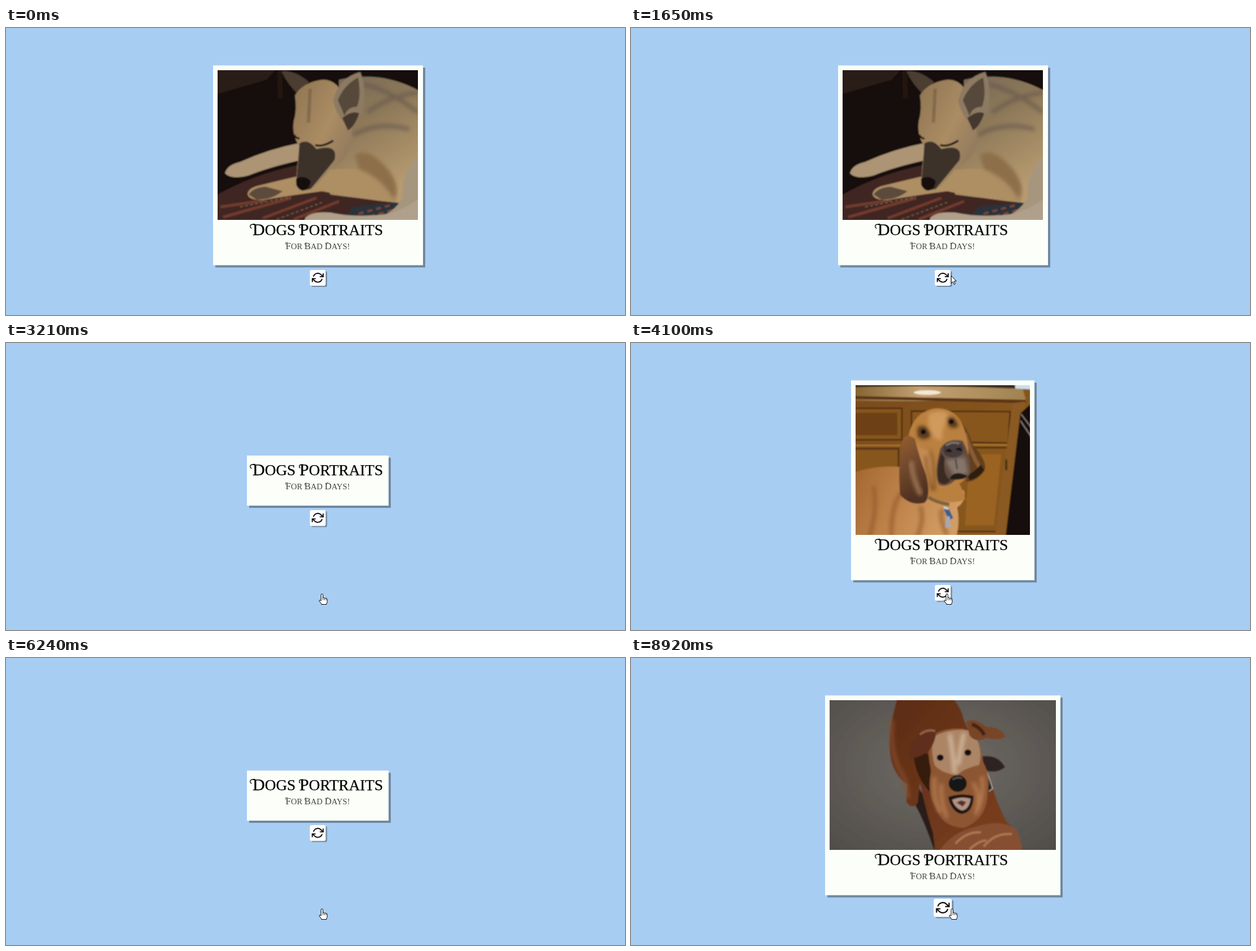
Animation of 1097x510 px, one loop 9360 ms. Source, as an HTML page:

```html
<!DOCTYPE html>
<html lang="en">
<head>
<meta charset="utf-8">
<title>Dogs Portraits</title>
<style>
html, body { margin: 0; width: 100%; height: 100%; overflow: hidden; background: #a8cdf3; }
.stage { display: block; width: 1097px; height: 510px; }
text { font-family: "Liberation Serif", "Times New Roman", serif; }
.title { font-size: 30.2px; stroke: #000; stroke-width: .25px; }
.title .sm { font-size: 27.2px; }
.sub { font-size: 17px; fill: #444; }
.sub .sm { font-size: 14.5px; }
.swash { fill: none; stroke: #000; stroke-linecap: round; }
.paper { fill: #fcfff9; }
.shade { fill: #70889f; }

/* One 9.36 s clock drives every part */
.card, .panel, .btn, .arrow, .hand, .pending { animation: 9.36s step-end infinite; }
.first { animation-name: first; }
.second { animation-name: second; }
.third { animation-name: third; }
.empty { animation-name: empty; }
.pending { animation-name: pending; }
.panel { animation-name: panel; }
.btn { animation-name: hover; animation-timing-function: ease; transform-origin: 552.5px 444px; }
.arrow { animation-name: arrow; }
.hand { animation-name: hand; }

@keyframes first { 0% { opacity: 1 } 32.79%, 100% { opacity: 0 } }
@keyframes second { 0% { opacity: 0 } 43.8% { opacity: 1 } 65.17%, 100% { opacity: 0 } }
@keyframes third { 0% { opacity: 0 } 75.85%, 100% { opacity: 1 } }
@keyframes empty {
  0%, 43.8% { opacity: 0 }
  32.79%, 65.17% { opacity: 1 }
  75.85%, 100% { opacity: 0 }
}
@keyframes pending { 0% { opacity: 1 } 76.06%, 100% { opacity: 0 } }
@keyframes panel {
  0%, 43.8% { transform: none }
  32.79%, 65.17% { transform: translateY(-133px) }
  75.85%, 100% { transform: none }
}
@keyframes hover {
  0%, 17.8% { transform: scale(1) }
  20.3%, 32.79% { transform: scale(1.15) }
  34.25%, 60.46% { transform: scale(1) }
  63.03%, 65.17% { transform: scale(1.15) }
  66.6%, 80.87% { transform: scale(1) }
  83.3%, 100% { transform: scale(1.15) }
}
@keyframes arrow {
  0% { opacity: 0; transform: translate(899px, 500px) }
  4.16% { opacity: 1; transform: translate(899px, 500px); animation-timing-function: cubic-bezier(.3, .1, .35, 1) }
  13.67% { opacity: 1; transform: translate(585px, 428px) }
  14.74% { opacity: 1; transform: translate(585px, 428px); animation-timing-function: ease-in-out }
  17.6% { opacity: 1; transform: translate(567px, 440px) }
  17.8%, 100% { opacity: 0; transform: translate(567px, 440px) }
}
@keyframes hand {
  0% { opacity: 0; transform: translate(566px, 441px) }
  17.8% { opacity: 1; transform: translate(566px, 441px); animation-timing-function: ease-out }
  19.4% { opacity: 1; transform: translate(560px, 446px); animation-timing-function: ease-in-out }
  22.11% { opacity: 1; transform: translate(554px, 435px) }
  27.77% { opacity: 1; transform: translate(554px, 435px); animation-timing-function: ease-out }
  28.84% { opacity: 1; transform: translate(560px, 446px) }
  80.87% { opacity: 1; transform: translate(560px, 446px); animation-timing-function: ease-in-out }
  85.04% { opacity: 1; transform: translate(565px, 446px) }
  86.75% { opacity: 1; transform: translate(566px, 446px) }
  94.76% { opacity: 1; transform: translate(567px, 446px) }
  95.29%, 100% { opacity: 1; transform: translate(569px, 446px) }
}
</style>
</head>
<body>
<svg class="stage" viewBox="0 0 1097 510">
  <defs>
    <filter id="soft" x="-5%" y="-5%" width="110%" height="110%"><feGaussianBlur stdDeviation="1"/></filter>
    <filter id="fold" x="-20%" y="-20%" width="140%" height="140%"><feGaussianBlur stdDeviation="3"/></filter>
    <linearGradient id="coat" x1="0" y1="0" x2=".5" y2="1">
      <stop stop-color="#75695a"/><stop offset=".45" stop-color="#8d7859"/><stop offset="1" stop-color="#b79b70"/>
    </linearGradient>
    <linearGradient id="face" x1="0" y1="0" x2="1" y2="1">
      <stop stop-color="#8e7452"/><stop offset=".5" stop-color="#ab8c63"/><stop offset="1" stop-color="#80705c"/>
    </linearGradient>
    <linearGradient id="tan" x1="0" y1="0" x2="1" y2=".3">
      <stop stop-color="#a0652f"/><stop offset=".5" stop-color="#bd8149"/><stop offset="1" stop-color="#d29c63"/>
    </linearGradient>
    <linearGradient id="wood" x1="0" y1="0" x2="1" y2="1">
      <stop stop-color="#784a1c"/><stop offset="1" stop-color="#945f22"/>
    </linearGradient>
    <linearGradient id="counter">
      <stop stop-color="#80602f"/><stop offset=".4" stop-color="#c3a273"/><stop offset="1" stop-color="#a08250"/>
    </linearGradient>
    <linearGradient id="ear" x1="0" y1="0" x2=".3" y2="1">
      <stop stop-color="#94602f"/><stop offset=".45" stop-color="#744a2d"/><stop offset="1" stop-color="#4e3020"/>
    </linearGradient>
    <radialGradient id="carpet" cx=".5" cy=".45" r=".7">
      <stop stop-color="#716c66"/><stop offset="1" stop-color="#504d49"/>
    </radialGradient>
    <linearGradient id="rust" x1="0" y1="0" x2="1" y2="1">
      <stop stop-color="#5c2b14"/><stop offset="1" stop-color="#7d4222"/>
    </linearGradient>
  </defs>

  <rect width="1097" height="510" fill="#a8cdf3"/>

  <g class="card first">
    <rect class="shade" x="371" y="70.5" width="372" height="355"/>
    <rect class="paper" x="367" y="66.5" width="372" height="355"/>
    <svg x="375" y="75" width="355" height="266" viewBox="375 75 355 266">
      <g filter="url(#soft)">
        <rect x="365" y="65" width="375" height="286" fill="#130e0b"/>
        <path d="M365 65H486L462 92L365 120Z" fill="#2c1c12"/>
        <path d="M480 65h9l2 60h-9z" fill="#24170f"/>
        <path d="M365 351V302Q430 262 520 243L640 300L740 310V351Z" fill="#402820"/>
        <path d="M380 318l80-12M385 336l120-34M455 338l95-36M510 340l80-32" stroke="#713a2d" stroke-width="5"/>
        <path d="M415 318l90-18M480 340l80-30" stroke="#a08061" stroke-width="1" stroke-dasharray="5 4"/>
        <path d="M615 318L705 308L692 336L600 338Z" fill="#29323b"/>
        <path d="M625 330l60-16M645 335l45-13" stroke="#7b4534" stroke-width="4" stroke-dasharray="9 7"/>
        <path d="M388 258Q392 243 415 238Q465 215 522 204L526 234Q470 246 430 262Q398 270 388 258Z" fill="#ac9474"/>
        <path d="M590 92C650 78 700 92 740 116V300Q712 314 690 310Q640 304 575 296L560 265Q585 240 590 200Z" fill="url(#coat)"/>
        <g filter="url(#fold)">
          <path d="M633 100Q680 110 730 150M640 150Q680 120 730 115M615 190Q660 165 715 180" fill="none" stroke="#5f5549" stroke-width="8" opacity=".55"/>
        </g>
        <path d="M740 215Q697 260 703 300Q690 330 640 345H740Z" fill="#a6967e"/>
        <path d="M530 338Q540 325 575 328Q620 338 680 330Q710 320 740 298V351H530Z" fill="#b0a08b"/>
        <path d="M428 295Q430 283 452 279Q520 262 572 252Q640 246 680 262Q702 285 690 310Q640 306 560 290Q500 298 455 306Q430 306 428 295Z" fill="#ae8e64"/>
        <path d="M618 225Q645 210 680 255Q700 285 686 304Q670 270 625 250Z" fill="#8d704b" filter="url(#fold)"/>
        <path d="M430 296q8-13 30-14l30 8q-20 16-46 15z" fill="#5b4b3c"/>
        <path d="M488 77Q512 74 537 96L520 120Q500 102 488 77Z" fill="#4b3c30"/>
        <path d="M512 120Q525 97 560 92Q590 90 600 130Q615 165 612 205Q604 238 575 250Q556 275 540 287Q520 292 514 278Q516 240 520 210Q506 190 510 165Q516 145 512 120Z" fill="url(#face)"/>
        <path d="M580 128Q590 88 628 78Q640 110 632 150Q622 168 606 176Q582 150 580 128Z" fill="#8d7a64"/>
        <path d="M588 128Q600 100 624 88Q630 120 622 140Q605 140 600 156Z" fill="#57483b"/>
        <path d="M596 160Q615 145 626 152Q618 175 606 182Z" fill="#44382f"/>
        <path d="M520 205Q535 195 550 215Q590 205 582 235Q560 262 540 286Q518 292 514 278Q518 240 520 205Z" fill="#3d332c"/>
        <path d="M514 268q14-8 26 4q-2 16-14 17q-12-2-12-21z" fill="#14100e"/>
        <path d="M548 208q14 4 32-8M511 190q4 7 9 6" fill="none" stroke="#1d1613" stroke-width="3.5"/>
        <path d="M539 108l-3 60" stroke="#6c573e" stroke-width="6" opacity=".5"/>
      </g>
    </svg>
  </g>

  <g class="card second">
    <rect class="shade" x="394" y="70.5" width="325" height="355"/>
    <rect class="paper" x="390" y="66.5" width="325" height="355"/>
    <svg x="398" y="75" width="309" height="266" viewBox="398 75 309 266">
      <g filter="url(#soft)">
        <rect x="388" y="65" width="329" height="286" fill="url(#wood)"/>
        <path d="M388 65H690L700 103H388Z" fill="url(#counter)"/>
        <path d="M388 65H682V81Q520 74 388 79Z" fill="#3b2d20"/>
        <path d="M388 94L700 101V107L388 99Z" fill="#5a3616"/>
        <ellipse cx="525" cy="88" rx="24" ry="4" fill="#f4e8d4"/>
        <path d="M680 65h37v18l-36-2z" fill="#cbdfea"/>
        <g fill="#87561f" stroke="#4c2b0e" stroke-width="2.5">
          <path d="M388 116H480V172H388ZM497 121L672 122L668 178L497 174ZM388 188H474V260H388ZM582 186H667L650 335H575Z"/>
        </g>
        <path d="M388 124H472V164H388Z" fill="#6d4016"/>
        <path d="M388 182H478M590 181H668" stroke="#b07a36" stroke-width="2"/>
        <path d="M600 198H656L643 324H592Z" fill="#9a6423"/>
        <path d="M676 107L699 104L663 351H644Z" fill="#8b5a24"/>
        <path d="M717 100L690 125L663 351H717Z" fill="#15100e"/>
        <path d="M691 126L717 160M690 138L717 178" stroke="#89827b" stroke-width="2"/>
        <path d="M665 207v19" stroke="#473016" stroke-width="4"/>
        <path d="M388 232Q440 214 490 222Q540 270 590 262Q594 282 578 292Q584 318 575 351H388Z" fill="url(#tan)"/>
        <g filter="url(#fold)" fill="none" stroke="#91592a" stroke-width="7" opacity=".7">
          <path d="M420 351Q438 300 430 255M462 351Q458 290 482 262M505 351Q522 310 512 290M560 341Q545 310 552 295"/>
        </g>
        <path d="M580 137Q597 150 605 180Q632 210 627 226Q614 246 594 247Q600 205 580 137Z" fill="#63401f"/>
        <path d="M592 160Q602 195 618 222" fill="none" stroke="#895b34" stroke-width="7"/>
        <path d="M600 244Q616 240 626 226L620 216Q606 232 596 234Z" fill="#2d1a10"/>
        <path d="M492 165Q500 122 540 116Q572 116 585 140Q602 175 597 215Q600 240 582 250Q590 265 592 278Q565 290 527 272Q500 240 492 165Z" fill="#b9803f"/>
        <g filter="url(#fold)">
          <path d="M528 125Q555 115 565 130Q550 150 552 172Q540 176 532 160Q524 145 528 125Z" fill="#cf9a5c"/>
          <path d="M504 178Q520 195 536 190Q528 220 536 258Q514 240 504 178Z" fill="#c48c52"/>
          <path d="M508 150Q524 142 532 164Q520 176 508 166ZM560 132Q574 128 580 148Q570 154 562 146Z" fill="#4d3018"/>
          <path d="M530 190Q538 215 538 262M522 200Q524 230 534 262" fill="none" stroke="#7a4a20" stroke-width="4"/>
        </g>
        <path d="M482 170Q490 160 503 170Q510 200 523 235Q532 275 520 284Q495 290 477 270Q472 215 482 170Z" fill="url(#ear)"/>
        <path d="M496 210Q500 245 514 270" fill="none" stroke="#96704f" stroke-width="9" filter="url(#fold)"/>
        <path d="M548 188Q560 168 588 174Q604 205 600 234Q588 246 578 240Q562 258 546 252Q536 232 548 188Z" fill="#624c3f"/>
        <g filter="url(#fold)">
          <path d="M556 208L592 202L598 232L574 240Z" fill="#84746a"/>
        </g>
        <path d="M550 195Q540 225 545 246Q556 256 566 244Q552 235 556 205Z" fill="#3a2920"/>
        <path d="M564 242Q572 224 596 236Q590 245 564 242Z" fill="#231a17"/>
        <path d="M575 206L578 224" stroke="#3b3130" stroke-width="2"/>
        <ellipse cx="571" cy="189" rx="18" ry="15" fill="#443b3b"/>
        <path d="M558 182q12-8 24-3" stroke="#77706f" stroke-width="4" fill="none"/>
        <path d="M559 193q5-6 8 1M577 190q6-5 8 2" stroke="#120e0d" stroke-width="4" fill="none"/>
        <g fill="#5e4028">
          <circle cx="518" cy="158" r="7.5"/><circle cx="568" cy="140" r="6.5"/>
        </g>
        <g fill="#130d08">
          <circle cx="518" cy="158" r="4.5"/><circle cx="568" cy="140" r="4"/>
        </g>
        <path d="M527 274Q540 283 564 287" fill="none" stroke="#80643b" stroke-width="6"/>
        <path d="M553 291l11 5 7 15-8 4z" fill="#395f91"/>
        <path d="M554 292l8 3" stroke="#d8dce0" stroke-width="3"/>
        <path d="M559 308h6l1 20h-9z" fill="#a4aab4"/>
      </g>
    </svg>
  </g>

  <g class="card third">
    <rect class="shade" x="348" y="70.5" width="417" height="355"/>
    <rect class="paper" x="344" y="66.5" width="417" height="355"/>
    <svg x="352" y="75" width="401" height="266" viewBox="352 75 401 266">
      <g filter="url(#soft)">
        <rect x="342" y="65" width="421" height="286" fill="url(#carpet)"/>
        <path d="M620 175Q650 170 663 194Q648 206 628 200Z" fill="#2f2320"/>
        <path d="M500 215L560 310L537 341Q520 290 504 262Z" fill="#2b1e18"/>
        <path d="M476 60C462 100 453 150 462 185Q470 212 490 225L488 256Q498 270 508 258L512 222Q525 280 535 310L540 351H695Q690 310 665 290Q645 250 640 225L590 110Q585 85 560 60Z" fill="url(#rust)"/>
        <path d="M463 110Q458 160 474 195Q488 215 492 250" fill="none" stroke="#87502f" stroke-width="8" opacity=".7" filter="url(#fold)"/>
        <path d="M500 170Q515 160 530 175L532 240Q505 215 500 170Z" fill="#351b11"/>
        <path d="M541 351Q565 310 610 300Q655 285 682 304Q694 325 693 351Z" fill="#865030"/>
        <path d="M575 330q20-22 45-20M625 335q20-25 50-22M600 340q15-15 30-16" fill="none" stroke="#ab7650" stroke-width="4"/>
        <path d="M620 180Q632 205 641 233L632 239L623 205Z" fill="#24211f"/>
        <path d="M621 181Q632 203 641 232L634 237" fill="none" stroke="#c9c6c0" stroke-width="1.3"/>
        <path d="M530 140Q555 122 590 126Q622 150 624 185Q638 210 632 240Q632 285 590 302Q550 300 540 265Q524 240 532 200Q524 170 530 140Z" fill="#8d5633"/>
        <path d="M536 140Q570 122 605 130Q625 160 617 190Q590 196 578 208Q550 205 538 190Q530 160 536 140Z" fill="#ab8565"/>
        <g filter="url(#fold)" fill="none">
          <path d="M565 135Q570 165 574 205M590 134Q584 160 580 190" stroke="#d0b59c" stroke-width="7"/>
          <path d="M538 212q-3 40 10 62M550 224q-2 30 10 60M622 210q5 40-12 68M606 222q14 20 6 48" stroke="#b57b4f" stroke-width="6"/>
        </g>
        <path d="M541 128Q515 120 503 145Q490 162 494 180Q515 175 528 165Q540 150 541 128Z" fill="#5f2f1a"/>
        <path d="M512 136q14-11 27-6" fill="none" stroke="#936146" stroke-width="4"/>
        <path d="M594 112Q610 106 630 122Q655 122 664 140Q650 148 630 142Q612 152 600 138Z" fill="#784427"/>
        <path d="M604 118q15 4 22 19" fill="none" stroke="#472313" stroke-width="6"/>
        <ellipse cx="579" cy="223" rx="16" ry="15" fill="#171515"/>
        <path d="M570 216q8-6 17-2" stroke="#535052" stroke-width="3" fill="none"/>
        <ellipse cx="548" cy="177" rx="6" ry="5.5" fill="#17100d"/>
        <ellipse cx="597" cy="168" rx="6" ry="5.5" fill="#17100d"/>
        <path d="M562 247Q585 239 607 245Q606 276 585 277Q568 273 562 247Z" fill="#1c1412"/>
        <path d="M569 252Q585 245 602 250Q599 270 586 271Q574 267 569 252Z" fill="#b29384"/>
        <path d="M577 257l8-4 9 3-6 8z" fill="#553229"/>
      </g>
    </svg>
    <rect class="paper pending" x="351" y="150" width="403" height="192"/>
  </g>

  <g class="card empty">
    <rect class="shade" x="431" y="204" width="251" height="89"/>
    <rect class="paper" x="427" y="200" width="251" height="89"/>
  </g>

  <g class="panel">
    <text class="title" x="437" y="368">D<tspan class="sm">OGS </tspan>P<tspan class="sm">ORTRAITS</tspan></text>
    <path class="swash" stroke-width="1.3" d="M435 356q-3-2-2-5q1-2.500 8-2.500M521 355q-2-1.500-1-4q1-2 6-2"/>
    <text class="sub" x="495.500" y="392.500">F<tspan class="sm">OR </tspan>B<tspan class="sm">AD </tspan>D<tspan class="sm">AYS!</tspan></text>
    <path class="swash" stroke-width=".6" d="M496 385q-2-2 0-4h3M530 386q-2-3 2-5M568 385q-2-4 3-4"/>
    <g class="btn">
      <rect class="shade" x="541" y="432" width="28" height="28" rx="3"/>
      <rect x="538.500" y="430" width="28" height="28" rx="3" fill="#fff"/>
      <g transform="translate(542 433.200) scale(.875)" fill="none" stroke="#000" stroke-width="2.100" stroke-linecap="round" stroke-linejoin="round">
        <path d="M23 4v6h-6M1 20v-6h6"/>
        <path d="M3.510 9a9 9 0 0 1 14.850-3.360L23 10M1 14l4.640 4.360A9 9 0 0 0 20.490 15"/>
      </g>
    </g>
  </g>

  <g fill="#fff" stroke="#000" stroke-linejoin="round">
    <path class="arrow" d="M.5.5V13.500l3-2.800 2 5 2.200-1-2-4.800h4z"/>
    <g class="hand">
      <path d="M-1.700 11V1.600a1.700 1.700 0 0 1 3.400 0V7q1.800-.9 2.900.3q1.900-.6 2.600.6q2-.3 2 1.600v4q0 2.400-1.200 3.600V18.500H-1v-1.200q-2.600-2.400-4-5.700q.6-1.900 3.300.6z"/>
      <path d="M1.700 7v4M4.600 7.600v3.400M7.200 8.200v2.800" stroke-width=".8"/>
    </g>
  </g>
</svg>
</body>
</html>
```
